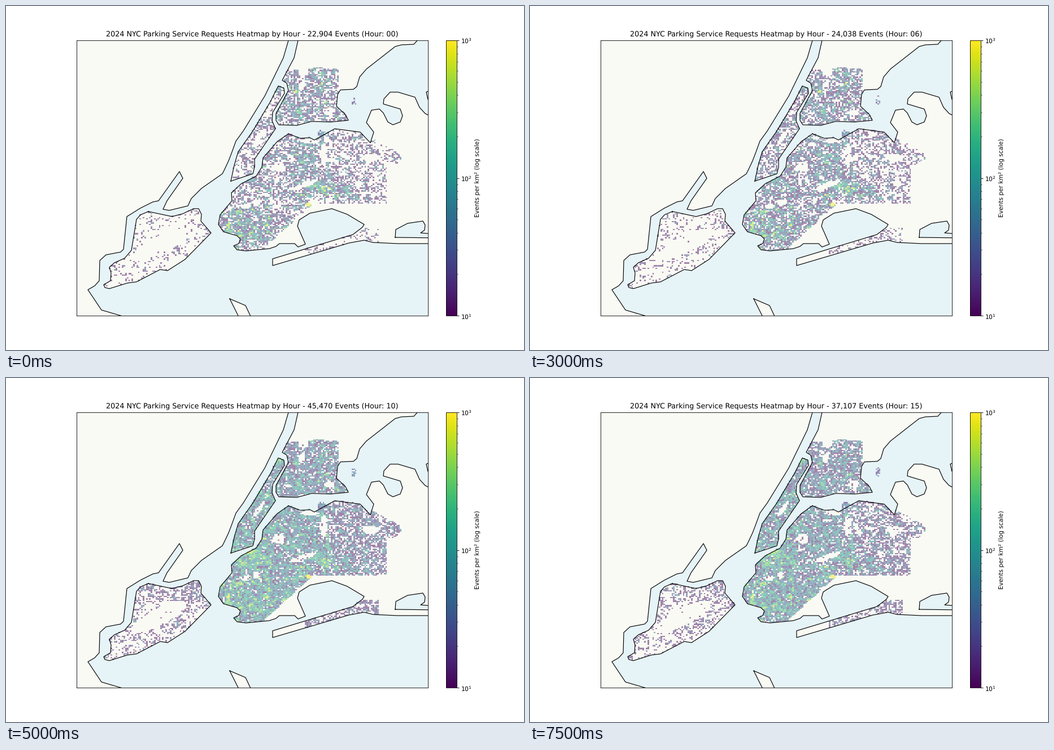
These frames come from a looping animation (917x611 px, 8 s). A matplotlib script:

```python
import numpy as np
import matplotlib.pyplot as plt
from matplotlib.animation import FuncAnimation
from matplotlib.cm import ScalarMappable
from matplotlib.colors import LogNorm
from matplotlib.path import Path

W, H, DPI = 917, 611, 64
K = 76.4 / DPI                      # point sizes are given for 76.4 dpi
MID, TOP, BOTTOM = .475 * W, .1 * H, .9 * H
HALF = (BOTTOM - TOP) * .7 / .55 / 2
LEFT, RIGHT = MID - HALF, MID + HALF
WATER, LAND = "#e6f3f7", "#fafaf4"
HOURS = 16

# Coastline key points, in stage pixels
JERSEY = [(100, 40), (505, 40), (500, 61), (491, 92), (458, 160), (420, 222),
          (407, 240), (399, 262), (394, 275), (387, 290), (383, 298), (346, 324),
          (328, 342), (322, 355), (289, 363), (278, 361), (285, 346), (313, 306),
          (307, 294), (270, 346), (260, 348), (238, 359), (214, 374), (208, 432),
          (203, 437), (177, 442), (166, 452), (165, 488), (157, 497), (145, 504),
          (169, 540), (220, 555), (100, 570)]
MAINLAND = [(521, 40), (517, 61), (510, 92), (489, 132), (497, 137), (500, 150),
            (478, 191), (478, 203), (483, 211), (515, 212), (541, 205), (575, 206),
            (606, 203), (601, 193), (585, 178), (587, 157), (592, 149), (615, 148),
            (621, 143), (626, 126), (638, 112), (689, 72), (700, 69), (722, 68),
            (740, 48)]
MANHATTAN = [(398, 311), (404, 283), (411, 259), (437, 222), (468, 170),
             (482, 142), (492, 146), (493, 155), (472, 189), (471, 204),
             (477, 218), (440, 272), (440, 286), (437, 298)]
LONG_ISLAND = [(500, 227), (521, 235), (538, 234), (546, 238), (582, 218),
               (627, 224), (645, 243), (651, 224), (638, 207), (647, 185),
               (661, 183), (668, 190), (676, 206), (685, 211), (698, 206),
               (702, 195), (698, 183), (668, 174), (669, 165), (680, 153),
               (694, 153), (724, 162), (732, 180), (742, 191), (770, 205),
               (770, 422), (693, 422), (650, 420), (634, 416), (607, 421),
               (472, 461), (472, 449), (614, 406), (631, 393), (634, 388),
               (604, 370), (577, 360), (538, 368), (519, 380), (516, 391),
               (530, 423), (517, 428), (511, 422), (484, 422), (478, 427),
               (466, 431), (425, 435), (409, 433), (403, 426), (412, 422),
               (415, 414), (409, 408), (385, 401), (376, 388), (379, 371),
               (400, 346), (399, 332), (416, 316), (443, 302), (453, 286),
               (455, 270), (480, 241)]
STATEN = [(252, 365), (294, 374), (313, 369), (332, 360), (341, 360), (346, 370),
          (345, 382), (363, 403), (317, 450), (286, 470), (273, 468), (231, 490),
          (215, 492), (183, 502), (175, 500), (173, 495), (185, 488), (186, 474),
          (183, 464), (192, 456), (210, 448), (222, 434), (231, 379), (238, 371)]
HOOK = [(396, 520), (424, 532), (442, 570), (421, 570)]
COVE = [(770, 140), (744, 153), (747, 166), (770, 170)]
POND = [(689, 411), (690, 397), (711, 386), (738, 382), (742, 389), (741, 398),
        (734, 403), (770, 406), (770, 412)]

# Busy spots: centre, spread, strength
NIGHT_SPOTS = [(423, 392, 32, 20, 4), (530, 266, 20, 22, 4), (550, 322, 32, 10, 5),
               (598, 325, 16, 12, 5), (508, 155, 14, 20, 1.5), (553, 130, 11, 14, 2)]
DAY_SPOTS = [(428, 324, 16, 11, 2), (404, 302, 7, 9, 1.4), (428, 395, 38, 20, .5),
             (595, 322, 22, 14, 2), (310, 376, 45, 12, 2)]
# Parks, cemeteries and airfields: centre, radii, tilt
GAPS = [(448, 233, 17, 4, -56), (424, 357, 8, 5, 0), (443, 350, 6, 6, 0),
        (483, 286, 10, 9, 0), (527, 319, 24, 5, -20), (563, 264, 7, 20, 0),
        (536, 241, 15, 5, 0), (526, 116, 9, 10, 0), (524, 142, 5, 10, 20),
        (573, 190, 9, 6, 0), (645, 270, 15, 7, 0), (272, 424, 52, 15, -28)]

CW, CH, COLS, ROWS = 2.844, 2.37, 186, 168
X0, Y0 = 171.0, 105.0
PER_EVENT = 12                      # one event in one cell, per square km
X, Y = np.meshgrid(X0 + CW * (np.arange(COLS) + .5),
                   Y0 + CH * (np.arange(ROWS) + .5))


def inside(poly):
    pts = np.column_stack([X.ravel(), Y.ravel()])
    return Path(poly).contains_points(pts).reshape(X.shape)


def ellipse(cx, cy, rx, ry, tilt=0):
    c, s = np.cos(np.radians(tilt)), np.sin(np.radians(tilt))
    dx, dy = X - cx, Y - cy
    return ((dx * c + dy * s) / rx) ** 2 + ((dy * c - dx * s) / ry) ** 2 < 1


def spots(items):
    return 1 + sum(a * np.exp(-((X - x) / sx) ** 2 / 2 - ((Y - y) / sy) ** 2 / 2)
                   for x, y, sx, sy, a in items)


def blur(a):
    b = sum(np.roll(a, (i, j), (0, 1)) for i in (-1, 0, 1) for j in (-1, 0, 1))
    return b / b.std()


def city_zones():
    """Yield mask, night weight and day weight of each district."""
    island = inside(LONG_ISLAND)
    town = (island & (Y > 222 + .53 * (X - 622)) & (Y > 217)
            & (Y < np.maximum(352, 405 - .92 * (X - 485)))
            & ((X < 674) | ellipse(682, 270, 17, 15)))
    yield inside(MANHATTAN), .38, 1.1
    yield (inside(MAINLAND) & (X > 498 - (Y - 110) * .3) & (Y > 110 + abs(X - 553) * .1)
           & ((X < 589) | (Y > 188))), .95, .8
    yield town & (X < 572), .6, 1.15
    yield town & (X >= 572), .33, .33
    yield inside(STATEN), .08, .09
    yield island & (Y > 395) & (X > 530) & (X < 660), .12, .2
    yield ellipse(560, 230, 9, 9), 1.2, .7
    yield ellipse(616, 169, 4, 10), .25, .22
    yield ellipse(535, 353, 5, 3), 25, 12


def rates():
    night, day = np.zeros(X.shape), np.zeros(X.shape)
    for mask, n, d in city_zones():
        night[mask], day[mask] = n, d
    thin = np.ones(X.shape)
    for gap in GAPS:
        thin[ellipse(*gap)] = .012
    rng = np.random.default_rng(24)
    fine, rough = rng.normal(size=(2,) + X.shape)
    z = .75 * fine + .66 * blur(rough)
    night *= spots(NIGHT_SPOTS) * thin * np.exp(1.3 * z)
    day *= spots(DAY_SPOTS) * thin * np.exp(.95 * z)
    return night / night.sum(), day / day.sum()


NIGHT, DAY = rates()
TOTALS = np.interp(np.arange(HOURS), [0, 4, 6, 8, 10, 12, 15],
                   [22904, 10578, 24038, 49732, 45470, 43195, 37107]).astype(int)


def density(hour):
    u = np.clip((hour - 4) / 6, 0, 1)
    d = u * u * (3 - 2 * u)
    lam = ((1 - d) * NIGHT + d * DAY) * TOTALS[hour]
    count = np.random.default_rng(100 + hour).poisson(lam)
    return np.ma.masked_equal(count * PER_EVENT, 0)


plt.rcParams.update({"font.family": "DejaVu Sans", "font.size": 10 * K,
                     "axes.linewidth": .8 * K, "axes.titlepad": 6 * K,
                     "axes.labelpad": 4 * K, "text.hinting": "none",
                     "toolbar": "None"})
fig = plt.figure(figsize=(W / DPI, H / DPI), dpi=DPI, facecolor="white")
ax = fig.add_axes([LEFT / W, .1, 2 * HALF / W, .8], facecolor=WATER)

norm = LogNorm(10, 1000)
maps = [density(h) for h in range(HOURS)]
grid = ax.imshow(maps[0], cmap="viridis", norm=norm, alpha=.5, aspect="auto",
                 interpolation="nearest", zorder=2,
                 extent=(X0, X0 + CW * COLS, Y0 + CH * ROWS, Y0))
for poly in (JERSEY, MAINLAND, MANHATTAN, LONG_ISLAND, STATEN, HOOK, COVE, POND):
    xs, ys = zip(*poly, poly[0])
    ax.fill(xs, ys, color=WATER if poly in (POND, COVE) else LAND, lw=0, zorder=1)
    ax.plot(xs, ys, color="black", lw=1.1 * K, zorder=3)
ax.set(xlim=(LEFT, RIGHT), ylim=(BOTTOM, TOP), xticks=[], yticks=[])
title = ax.set_title("")

cax = fig.add_axes([.85, .1, .02, .8])
bar = fig.colorbar(ScalarMappable(norm, "viridis"), cax=cax)
bar.set_label("Events per km² (log scale)")
cax.tick_params(which="major", length=3.5 * K, width=.8 * K, pad=3.5 * K)
cax.tick_params(which="minor", length=2 * K, width=.6 * K)


def update(hour):
    grid.set_data(maps[hour])
    title.set_text("2024 NYC Parking Service Requests Heatmap by Hour - "
                   f"{TOTALS[hour]:,} Events (Hour: {hour:02d})")
    return grid, title


anim = FuncAnimation(fig, update, frames=HOURS, interval=500,
                     repeat=True, repeat_delay=0, blit=False)
plt.show()
```
